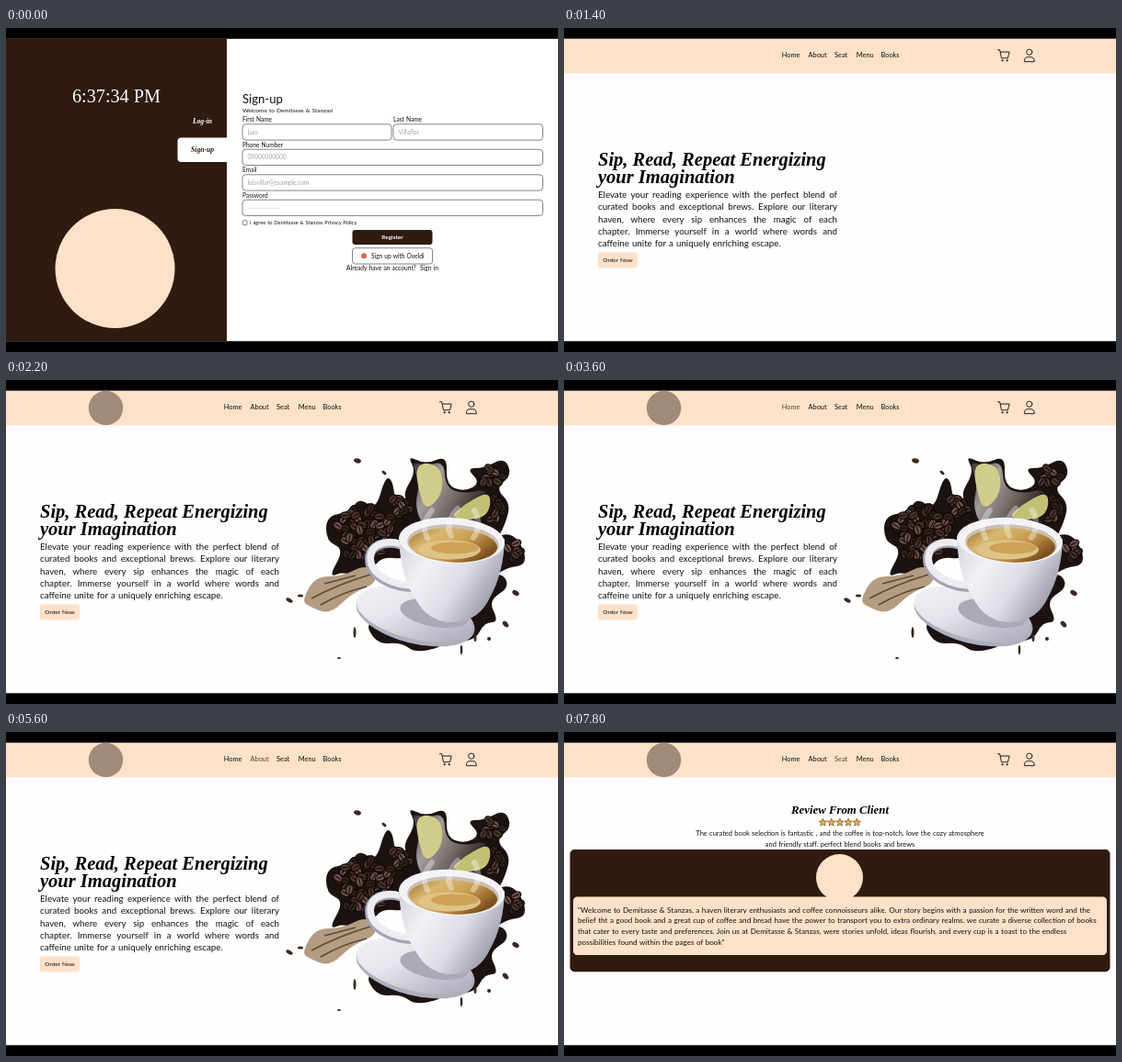
Animation of 600 by 353 pixels, one loop 8000 ms. Source, as an HTML page:

```html
<!DOCTYPE html>
<html lang="en">
<head>
<meta charset="utf-8">
<title>Book café</title>
<style>
  html, body { margin: 0; width: 100%; height: 100%; overflow: hidden; background: #000; }
  svg { display: block; width: 600px; height: 353px; }
  text, .copy { font-family: Lato, "Open Sans", sans-serif; word-spacing: .06em; }
  .script { font: italic bold 20.5px "Liberation Serif", serif; word-spacing: 0; }
  .clock { font-family: "Liberation Serif", serif; word-spacing: 0; }
  .copy { font-size: 9.75px; line-height: 13.4px; color: #111; }
  .copy div { text-align-last: justify; white-space: nowrap; }
  .copy div:last-child { text-align-last: left; }
  .line { fill: none; stroke: #222; stroke-width: 1; stroke-linecap: round; stroke-linejoin: round; }
</style>
</head>
<body>
<svg id="stage" viewBox="0 0 600 353" xmlns="http://www.w3.org/2000/svg"></svg>
<script>
const LOOP = 8000;
const TOP = 11.8, BOTTOM = 341.2;
const DARK = '#2f1b0f', PEACH = '#fde1c8', INK = '#111', HOVER = '#54453b';
const SHOP = 'Demitasse &amp; Stanzas';

const rect = (x, y, w, h, fill, rx = 0, extra = '') =>
  `<rect x="${x}" y="${y}" width="${w}" height="${h}" fill="${fill}" rx="${rx}" ${extra}/>`;
const circle = (x, y, r, fill) => `<circle cx="${x}" cy="${y}" r="${r}" fill="${fill}"/>`;
const ellipse = (x, y, rx, ry, fill, turn = 0) =>
  `<ellipse cx="${x}" cy="${y}" rx="${rx}" ry="${ry}" fill="${fill}" transform="rotate(${turn} ${x} ${y})"/>`;
const path = (d, fill, extra = '') => `<path d="${d}" fill="${fill}" ${extra}/>`;
const text = (x, y, size, str, fill = INK, extra = '') =>
  `<text x="${x}" y="${y}" font-size="${size}" fill="${fill}" ${extra}>${str}</text>`;
const script = (x, y, size, str, fill = '#000', extra = '') =>
  `<text class="script" x="${x}" y="${y}" style="font-size:${size}px" fill="${fill}" ${extra}>${str}</text>`;
const MIDDLE = 'text-anchor="middle"';
const group = (id, body) => `<g id="${id}">${body}</g>`;
const page = (x, w, fill) => rect(x, TOP, w, BOTTOM - TOP, fill);

function seeded(seed) {
  return () => (seed = (seed * 16807) % 2147483647) / 2147483647;
}

// ---- Account pages ----
const outline = (x, y, w, h, rx) => rect(x, y, w, h, '#fff', rx, 'stroke="#666" stroke-width=".8"');

function field(x, y, w, label, hint) {
  const value = hint
    ? text(x + 5.5, y + 11.2, 6.6, hint, '#a3a3a3')
    : `<path d="M${x + 7} ${y + 9}h34" stroke="#999" stroke-width="1.1" stroke-linecap="round" stroke-dasharray="0 3"/>`;
  return text(x, y - 2.5, 6.6, label) + outline(x, y, w, 17.3, 3.5) + value;
}

function buttons(y, action, question) {
  return rect(376.5, y, 87, 16, DARK, 3) +
    text(420, y + 10.4, 6.4, action, '#fff', MIDDLE + ' font-weight="bold"') +
    outline(376.5, y + 19.7, 87, 17.3, 3) + circle(389, y + 28.3, 3, '#e0664f') +
    text(397, y + 30.7, 6.6, 'Sign up with Oveldi') +
    text(420, y + 44.3, 6.7, question, INK, MIDDLE);
}

function tabs(active) {
  const tab = (name, y) => {
    const on = name === active;
    return (on ? path(`M240 ${y - 13.5}h-49.5q-4 0-4 4v18.5q0 4 4 4h49.5z`, '#fff') : '') +
      script(213.5, y + 2, 7.6, name, on ? DARK : '#fff', MIDDLE);
  };
  return tab('Log-in', 102) + tab('Sign-up', 133);
}

const heading = (y, title) =>
  text(257, y, 13.1, title) + text(257, y + 10, 6.5, `Welcome to ${SHOP}!`);
const email = y => field(257, y, 326.5, 'Email', 'luisvillar@example.com');
const password = y => field(257, y, 326.5, 'Password');

const signUp = tabs('Sign-up') + heading(82, 'Sign-up') +
  field(257, 104.8, 162, 'First Name', 'Luis') +
  field(421, 104.8, 162.5, 'Last Name', 'Villaflor') +
  field(257, 132.2, 326.5, 'Phone Number', '09000000000') +
  email(159.8) + password(187.2) +
  outline(257.2, 209.7, 4.8, 4.8, 1) +
  text(265, 214.3, 5.75, `I agree to ${SHOP} Privacy Policy`) +
  buttons(220, 'Register', 'Already have an account? &#160;Sign in');

const logIn = tabs('Log-in') + heading(112, 'Log-in') +
  email(134.8) + password(162.2) +
  buttons(186, 'Log-in', 'Don’t have an account? &#160;Sign up');

const account = page(0, 600, '#fff') + page(0, 240, DARK) +
  `<text id="clock" class="clock" x="72" y="81" font-size="20.2" fill="#fff"></text>` +
  circle(118.5, 262, 65, PEACH) + group('signUp', signUp) + group('logIn', logIn);

// ---- Shop header ----
const links = [['Home', 236.8], ['About', 265.5], ['Seat', 294], ['Menu', 317.8], ['Books', 344.5]];
const header = rect(0, TOP, 600, 49.5 - TOP, PEACH) +
  links.map(([name, x]) => text(x, 32.3, 7.4, name, INK, `id="nav${name}"`)).join('') +
  `<g class="line"><path d="M471.5 23.8h2.2l1.8 9h7l1.7-6.7h-10"/>
   <circle cx="476.6" cy="35.3" r=".7"/><circle cx="481.6" cy="35.3" r=".7"/>
   <circle cx="505.8" cy="26.3" r="3.1"/><path d="M500.3 36.3q0-4.6 4-4.6h3q4 0 4 4.6z"/></g>`;

// ---- Coffee picture ----
// Closed soft outline: each point is a control, curves meet halfway between points.
function blob(points, fill) {
  const p = points.trim().split(/\s*,\s*/).map(s => s.split(/\s+/).map(Number));
  const mid = i => {
    const a = p[i % p.length], b = p[(i + 1) % p.length];
    return `${(a[0] + b[0]) / 2} ${(a[1] + b[1]) / 2}`;
  };
  return path(`M${mid(p.length - 1)}` + p.map((c, i) => `Q${c[0]} ${c[1]} ${mid(i)}`).join('') + 'Z', fill);
}

function beans(count, x, y, rx, ry, seed) {
  const rnd = seeded(seed);
  return Array.from({ length: count }, () => {
    const a = rnd() * 2 * Math.PI, r = Math.sqrt(rnd()), turn = rnd() * 180;
    const bx = x + rx * r * Math.cos(a), by = y + ry * r * Math.sin(a);
    const tone = ['#4a342c', '#6b5149', '#33221c'][Math.floor(rnd() * 3)];
    return ellipse(bx, by, 6.2, 4.4, '#120a09', turn) + ellipse(bx, by, 5, 3.3, tone, turn) +
      ellipse(bx, by, 4.6, .6, '#160d0a', turn);
  }).join('');
}

const gradient = (id, stops) => `<linearGradient id="${id}" x1="0" y1="0" x2="1" y2=".5">` +
  stops.map((c, i) => `<stop offset="${i / (stops.length - 1)}" stop-color="${c}"/>`).join('') + '</linearGradient>';

const drops = [[382, 88, 4, 2.5, 15], [411, 101, 3, 1.5, 40], [308, 240, 4, 2, 30], [320, 235, 3, 1.5, 0],
  [379, 275, 1.5, 6, 0], [362, 303, 2, 1, 0], [554, 232, 4, 2.5, 30], [543, 266, 4, 2.5, 50],
  [525, 282, 2, 2, 0], [495, 294, 1.3, 5, 0], [510, 281, 1.5, 4, 0]];

const picture =
  `<defs>${gradient('china', ['#d2d2dc', '#f1f1f6', '#dcdce5', '#9c9cab'])}
   ${gradient('plate', ['#f4f4f8', '#e4e4ec', '#b4b4c2'])}
   ${gradient('coffee', ['#96672c', '#d9b871', '#c89a4c', '#7d501f'])}
   ${gradient('splash', ['#3a3431', '#a39d99', '#6b625e', '#1c1411'])}</defs>` +
  blob(`348 148, 374 144, 384 128, 402 142, 412 106, 420 108, 424 138, 440 126, 456 160, 440 196,
    404 192, 394 222, 368 208, 350 216, 368 184, 348 176`, '#1c1210') +
  blob(`430 126, 446 100, 436 82, 456 92, 480 82, 478 114, 498 122, 516 112, 500 96, 520 96, 542 84,
    550 104, 532 118, 548 134, 544 154, 530 182, 450 180, 444 142`, '#1c1210') +
  blob('528 172, 550 166, 564 186, 564 202, 546 204, 530 214', '#1c1210') +
  blob('512 224, 538 208, 548 226, 524 240, 536 264, 520 264, 510 284, 480 286, 490 254', '#1c1210') +
  blob('388 258, 402 288, 430 286, 446 298, 482 288, 470 262', '#1c1210') +
  beans(75, 392, 167, 34, 30, 71) + beans(12, 424, 142, 14, 16, 19) +
  beans(9, 528, 105, 12, 10, 37) + beans(9, 532, 142, 9, 18, 43) + beans(7, 550, 186, 8, 10, 53) +
  blob('440 88, 456 94, 476 88, 478 118, 500 124, 522 118, 530 140, 516 164, 456 164, 444 138, 450 112', 'url(#splash)') +
  blob('444 90, 472 92, 476 122, 458 142, 450 128', '#cfcd8c') +
  blob('480 152, 500 134, 528 120, 524 152', '#c2c075') +
  blob('322 240, 336 214, 366 214, 392 200, 406 220, 376 232, 352 256, 328 246', '#b39c82') +
  path('M332 238Q362 222 396 212M342 245Q366 231 392 225M346 222L380 213', 'none',
    'stroke="#5e4a3b" stroke-width="1.6"') +
  ellipse(445, 258, 66, 29, '#aeaebd', 14) + ellipse(444, 255, 65, 27, 'url(#plate)', 14) +
  ellipse(466, 254, 38, 15, '#a9a9b8', 10) +
  path('M438 184C420 173 395 177 395 195C395 214 420 226 444 226', 'none', 'stroke="#a3a3b2" stroke-width="10"') +
  path('M438 183C420 172 396 176 396 194C396 212 420 224 444 224', 'none', 'stroke="#ececf2" stroke-width="7.5"') +
  path('M427 173Q429 216 446 240Q459 264 486 264Q514 263 526 237Q541 210 542 173Z', 'url(#china)') +
  ellipse(484.5, 175, 57.5, 25, '#f2f2f6', 3) + ellipse(486, 178, 50, 20.5, '#cbbfae', 3) +
  ellipse(486, 180, 48, 18.5, 'url(#coffee)', 3) + ellipse(482, 185, 34, 10.5, '#dfc488') +
  ellipse(488, 183, 26, 6.5, '#cda258') +
  path('M458 172Q450 158 463 142M484 170Q476 156 491 140M508 172Q518 158 509 142', 'none',
    'stroke="#fff" stroke-width="6" stroke-linecap="round" opacity=".35"') +
  drops.map(([x, y, rx, ry, turn]) => ellipse(x, y, rx, ry, '#3a271d', turn)).join('');

// ---- Shop pages ----
const pitch = ['Elevate your reading experience with the perfect blend of',
  'curated books and exceptional brews. Explore our literary',
  'haven, where every sip enhances the magic of each',
  'chapter. Immerse yourself in a world where words and',
  'caffeine unite for a uniquely enriching escape.'];

const home = script(37, 149.5, 20.5, 'Sip, Read, Repeat Energizing') + script(37, 168.5, 20.5, 'your Imagination') +
  `<foreignObject x="37" y="174.7" width="260" height="70"><div class="copy">` +
  pitch.map(line => `<div>${line}</div>`).join('') + '</div></foreignObject>' +
  rect(37, 244.5, 43, 16.7, PEACH, 3) + text(58.5, 255.2, 6.5, 'Order Now', INK, MIDDLE) +
  group('picture', picture);

function star(x, y) {
  const points = Array.from({ length: 10 }, (_, i) => {
    const r = i % 2 ? 1.9 : 4.4, a = (i / 5 - .5) * Math.PI;
    return `${x + r * Math.cos(a)},${y + r * Math.sin(a)}`;
  });
  return `<polygon points="${points.join(' ')}" fill="#f3b63f" stroke="#6b4520" stroke-width=".7"/>`;
}

const story = [`"Welcome to ${SHOP}, a haven literary enthusiasts and coffee connoisseurs alike. Our story begins with a passion for the written word and the`,
  'belief tht a good book and a great cup of coffee and bread have the power to transport you to extra ordinary realms. we curate a diverse collection of books',
  `that cater to every taste and preferences. Join us at ${SHOP}, were stories unfold, ideas flourish, and every cup is a toast to the endless`,
  'possibilities found within the pages of book"'];

const review = script(300, 89, 12.8, 'Review From Client', '#000', MIDDLE) +
  [0, 1, 2, 3, 4].map(i => star(281.5 + 9.2 * i, 98.6)).join('') +
  text(300, 113.3, 7.46, 'The curated book selection is fantastic , and the coffee is top-notch. love the cozy atmosphere', INK, MIDDLE) +
  text(300, 124.7, 7.46, 'and friendly staff. perfect blend books and brews', INK, MIDDLE) +
  rect(6.5, 128, 587, 133.3, DARK, 5) + circle(299.5, 158.5, 25.5, PEACH) +
  rect(10, 179.5, 580, 63.5, PEACH, 4.5) +
  story.map((line, i) => text(15, 196.8 + 11.6 * i, 8.1, line)).join('');

const shop = page(0, 600, '#fffdfd') + header +
  group('badge', circle(108.5, 30.5, 18.7, '#a08b7b')) + group('home', home) + group('review', review);

document.getElementById('stage').innerHTML =
  rect(0, 0, 600, 353, '#000') + group('account', account) + group('shop', shop);

// ---- Timeline ----
const hovers = [['Home', 3600, 3800], ['About', 3800, 4600], ['Home', 4800, 5600],
  ['About', 5600, 6400], ['Seat', 7800, 8000]];
const el = id => document.getElementById(id);
const show = (id, on) => el(id).setAttribute('display', on ? 'inline' : 'none');

function render(t) {
  show('account', t < 1400);
  show('signUp', t < 400);
  show('logIn', t >= 400);
  el('clock').textContent = t < 200 ? '6:37:34 PM' : '6:37:35 PM';
  show('shop', t >= 1400);
  show('badge', t >= 1800);
  show('picture', t >= 1800);
  show('home', t < 6000);
  show('review', t >= 6000);
  for (const [name] of links) {
    const over = hovers.some(([n, from, to]) => n === name && t >= from && t < to);
    el('nav' + name).setAttribute('fill', over ? HOVER : INK);
  }
}

const start = performance.now();
function tick() {
  render((performance.now() - start) % LOOP);
  requestAnimationFrame(tick);
}
tick();
</script>
</body>
</html>
```
